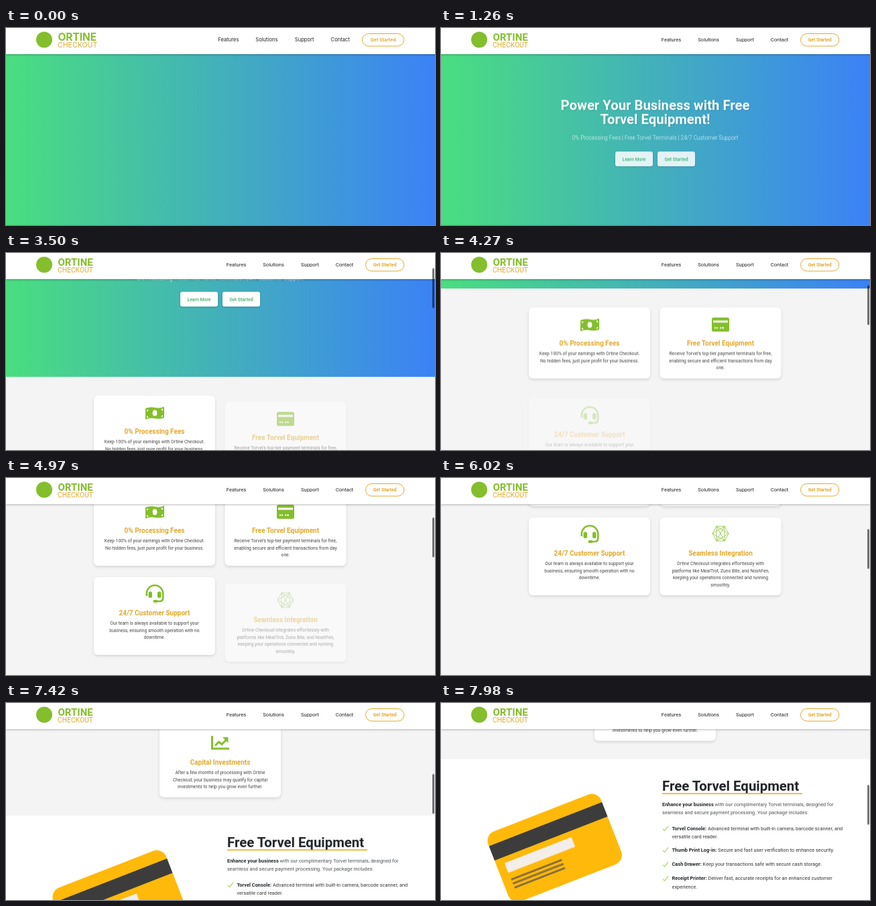
An HTML page that plays this animation: 640x294 px, repeating every 8000 ms.

```html
<!DOCTYPE html>
<html lang="en">
<head>
<meta charset="utf-8">
<title>Payments landing page</title>
<style>
  html, body { margin: 0; width: 100%; height: 100%; overflow: hidden; background: #fff; }
  svg { display: block; width: 100vw; height: 100vh; font-family: Roboto, "Open Sans", sans-serif; }
  .fallback { font-family: Inter, Arial, sans-serif; }
  .mid { text-anchor: middle; }
  .bold { font-weight: 700; }
  .green { fill: #84be2c; }
  .gold { fill: #e3a92c; }
  .nav { font-size: 7.6px; fill: #222; }
  .pill { fill: none; stroke: #e3a92c; }
  .bar { fill: #fff; filter: drop-shadow(0 1px 1.5px rgba(0,0,0,.28)); }
  .h1 { font-size: 20.3px; font-weight: 700; fill: #fff; filter: drop-shadow(1px 1px 1px rgba(0,0,0,.15)); }
  .sub { font-size: 8.3px; font-weight: 300; fill: #fff; }
  .button { fill: #fff; filter: drop-shadow(0 1.5px 1.5px rgba(0,0,0,.18)); }
  .label { font-size: 6.9px; font-weight: 500; fill: #3fae6a; }
  .card { fill: #fff; filter: drop-shadow(0 2px 2px rgba(0,0,0,.13)); }
  .title { font-size: 10px; font-weight: 700; }
  .body { font-size: 6.75px; fill: #444; }
  .h2 { font-size: 20.4px; font-weight: 700; fill: #212529; }
  .text { font-size: 7.42px; fill: #4b4f54; }
  .item { font-size: 7.42px; fill: #333; }
  .item .bold, .text .bold { fill: #212529; }
</style>
</head>
<body>
<svg viewBox="0 0 640 294" preserveAspectRatio="none">
  <defs>
    <linearGradient id="sky"><stop stop-color="#4ade80"/><stop offset="1" stop-color="#3b82f6"/></linearGradient>
  </defs>
  <g id="page">
    <rect width="640" height="310" fill="url(#sky)"/>
    <g id="headline" class="h1 mid">
      <text x="319.5" y="122">Power Your Business with Free</text>
      <text x="319.5" y="143.3">Torvel Equipment!</text>
    </g>
    <text id="tagline" class="sub mid" x="319.5" y="166">0% Processing Fees | Free Torvel Terminals | 24/7 Customer Support</text>
    <g id="actions" class="mid">
      <rect class="button" x="260" y="183" width="56" height="22" rx="3"/>
      <rect class="button" x="323" y="183" width="56" height="22" rx="3"/>
      <text class="label" x="288" y="196.7">Learn More</text>
      <text class="label" x="351" y="196.7">Get Started</text>
    </g>
    <rect y="310" width="640" height="414" fill="#f4f4f4"/>
    <g id="cards"></g>
    <rect y="724" width="640" height="300" fill="#fff"/>
    <g id="plastic">
      <g transform="translate(65 837) rotate(-21.3)">
        <rect width="181" height="112" rx="15" fill="#ffb90b"/>
        <rect y="18" width="181" height="23" fill="#3c3c3c"/>
        <rect x="12.5" y="50" width="107" height="15.5" fill="#f3eeea"/>
        <path d="M13 76.5h81M13 83h81M13 89.5h81" stroke="#8a6f35" stroke-width="3"/>
      </g>
    </g>
    <g id="details">
      <text class="h2" x="330" y="771">Free Torvel Equipment</text>
      <rect class="gold" x="330" y="774.5" width="209" height="1.6"/>
      <text class="text" x="330" y="794"><tspan class="bold">Enhance your business</tspan> with our complimentary Torvel terminals, designed for</text>
      <text class="text" x="330" y="806.3">seamless and secure payment processing. Your package includes:</text>
    </g>
  </g>

  <rect class="bar" y="-4" width="640" height="43"/>
  <circle class="green" cx="57" cy="17.5" r="12"/>
  <g id="earlyNav" class="fallback"></g>
  <g id="nav"></g>
  <rect id="thumb" x="636" y="0" width="3" height="59.5" rx="1.5" fill="#000" fill-opacity=".55"/>
</svg>

<script>
const LOOP = 8000;
const $ = id => document.getElementById(id);

function add(parent, tag, attrs, content = '') {
  const el = document.createElementNS('http://www.w3.org/2000/svg', tag);
  for (const key in attrs) el.setAttribute(key, attrs[key]);
  el.innerHTML = content;
  return parent.appendChild(el);
}
const write = (parent, cls, x, y, content) => add(parent, 'text', { class: cls, x, y }, content);

// Steps are [ms, properties, easing].
function play(el, steps) {
  const frames = steps.map(([ms, props, easing = 'linear']) => ({ offset: ms / LOOP, easing, ...props }));
  el.animate(frames, { duration: LOOP, iterations: Infinity });
}

function reveal(el, start, length, dx = 0, dy = 0) {
  const hidden = { opacity: 0, transform: `translate(${dx}px, ${dy}px)` };
  const shown = { opacity: 1, transform: 'translate(0px, 0px)' };
  play(el, [[0, hidden], [start, hidden, 'ease-out'], [start + length, shown], [LOOP, shown]]);
}

// Header, before and after the web font arrives.
function buildNav(parent, links, pillX, brandSize, nameSize) {
  add(parent, 'text', { class: 'green bold', x: 77.5, y: 18.5, 'font-size': brandSize }, 'ORTINE');
  add(parent, 'text', { class: 'gold', x: 77, y: 29, 'font-size': nameSize }, 'CHECKOUT');
  ['Features', 'Solutions', 'Support', 'Contact'].forEach((name, i) => write(parent, 'nav', links[i], 20.4, name));
  add(parent, 'rect', { class: 'pill', x: pillX, y: 8.5, width: 593.8 - pillX, height: 18.5, rx: 9.25 });
  add(parent, 'text', { class: 'gold mid bold', x: (pillX + 593.8) / 2, y: 20.2, 'font-size': 6.8 }, 'Get Started');
}
buildNav($('earlyNav'), [316.3, 372.3, 430.8, 484.6], 531.5, 15.4, 10.6);
buildNav($('nav'), [328.8, 383.3, 440, 491.8], 536.5, 15, 10.3);

const icons = {
  note: `<path d="M0 3Q7 0 14 1.8T28 .5V17Q21 19.6 14 18T0 19.5Z"/>
    <ellipse cx="14" cy="10" rx="3.4" ry="4.4" fill="#fff"/>
    <path d="M2 5h3l-3 3zM26 3.5v3.5l-3-3zM2 17v-3l3 2.5zM26 15.5v-3l-3 3z" fill="#fff"/>`,
  credit: `<rect width="26" height="21" rx="2.5"/>
    <path d="M2 6h22" stroke="#fff" stroke-width="3"/>
    <path d="M4 15.5h2m1 0h2m3 0h2m1 0h3" stroke="#fff" stroke-width="2.2"/>`,
  headset: `<path d="M1.8 17V13.5A12.2 12.2 0 0 1 26.2 13.5V20Q26.2 25 21 25H15" fill="none" stroke="#84be2c" stroke-width="2.6"/>
    <rect x="4.5" y="10.5" width="5.5" height="9.5" rx="2.5"/><rect x="18" y="10.5" width="5.5" height="9.5" rx="2.5"/>
    <rect x="11.5" y="23" width="7" height="4" rx="2"/>`,
  hexagon: `<path d="M.5 12.5L6.5 1.5H18.5L24.5 12.5L18.5 23.5H6.5ZM.5 12.5L18.5 1.5V23.5ZM24.5 12.5L6.5 1.5V23.5ZM6.5 1.5L18.5 23.5M18.5 1.5L6.5 23.5" fill="none" stroke="#84be2c" stroke-width=".7"/>`,
  chart: `<path d="M1.5 0V19H27M6 14.5L11.5 9L16 12.5L22.5 6" fill="none" stroke="#84be2c" stroke-width="3"/>
    <path d="M17 2H25.5V10.5Z"/>`
};

const cards = [
  { x: 131, y: 338, h: 106, icon: 'note', iconX: 208, iconY: 354, start: 2700, title: '0% Processing Fees',
    lines: ['Keep 100% of your earnings with Ortine Checkout.', 'No hidden fees, just pure profit for your business.'] },
  { x: 326.5, y: 338, h: 106, icon: 'credit', iconX: 404, iconY: 353, start: 3270, title: 'Free Torvel Equipment',
    lines: ['Receive Torvel\'s top-tier payment terminals for free,', 'enabling secure and efficient transactions from day', 'one.'] },
  { x: 131, y: 461, h: 116, icon: 'headset', iconX: 208, iconY: 472, start: 4150, title: '24/7 Customer Support',
    lines: ['Our team is always available to support your', 'business, ensuring smooth operation with no', 'downtime.'] },
  { x: 326.5, y: 461, h: 116, icon: 'hexagon', iconX: 404.5, iconY: 472.5, start: 4770, title: 'Seamless Integration',
    lines: ['Ortine Checkout integrates effortlessly with', 'platforms like MealTrot, Zuno Bite, and NoshFen,', 'keeping your operations connected and running', 'smoothly.'] },
  { x: 229, y: 591, h: 105.5, icon: 'chart', iconX: 306, iconY: 605, start: 6330, title: 'Capital Investments',
    lines: ['After a few months of processing with Ortine', 'Checkout, your business may qualify for capital', 'investments to help you grow even further.'] }
];
for (const c of cards) {
  const group = add($('cards'), 'g', { class: 'mid' });
  const middle = c.x + 90.5;
  const titleY = c.y + 56.5;
  add(group, 'rect', { class: 'card', x: c.x, y: c.y, width: 181, height: c.h, rx: 6 });
  add(group, 'g', { class: 'green', transform: `translate(${c.iconX} ${c.iconY})` }, icons[c.icon]);
  write(group, 'title gold', middle, titleY, c.title);
  c.lines.forEach((line, i) => write(group, 'body', middle, titleY + 14.4 + i * 10.7, line));
  reveal(group, c.start, 700, 0, 18);
}

const features = [
  [829.5, 'Torvel Console:', 'Advanced terminal with built-in camera, barcode scanner, and', 'versatile card reader.'],
  [861.5, 'Thumb Print Log-in:', 'Secure and fast user verification to enhance security.'],
  [883, 'Cash Drawer:', 'Keep your transactions safe with secure cash storage.'],
  [904.2, 'Receipt Printer:', 'Deliver fast, accurate receipts for an enhanced customer', 'experience.']
];
for (const [y, name, first, second] of features) {
  add($('details'), 'path', { d: `M331 ${y - 1.5}l2.6 2.8l5.4 -7.2`, fill: 'none', stroke: '#84be2c', 'stroke-width': 1 });
  write($('details'), 'item', 344.5, y, `<tspan class="bold">${name}</tspan> ${first}`);
  if (second) write($('details'), 'item', 344.5, y + 12.4, second);
}

play($('earlyNav'), [[0, { opacity: 1 }], [400, { opacity: 1 }], [400, { opacity: 0 }], [LOOP, { opacity: 0 }]]);
reveal($('nav'), 400, 0);
reveal($('headline'), 350, 1050, 0, 9);
reveal($('tagline'), 450, 1050, 0, 9);
reveal($('actions'), 550, 1050, 0, 9);
reveal($('plastic'), 6550, 800, -13, -8);
reveal($('details'), 6690, 700, 0, 10);

const scroll = [[0, 0], [2650, 0], [3500, 125], [4250, 255], [4970, 313], [5110, 330], [6020, 402], [6930, 482], [7980, 640], [LOOP, 642]];
play($('page'), scroll.map(([ms, top]) => [ms, { transform: `translateY(${-top}px)` }]));

const thumbAt = top => ({ transform: `translateY(${Math.max(0, top * .1935 - 1.7)}px)` });
play($('thumb'), scroll.flatMap(([ms, top]) => {
  const step = [ms, { ...thumbAt(top), opacity: ms > 2650 ? 1 : 0 }];
  return ms === 2650 ? [step, [2650, { ...thumbAt(top), opacity: 1 }]] : [step];
}));
</script>
</body>
</html>
```
